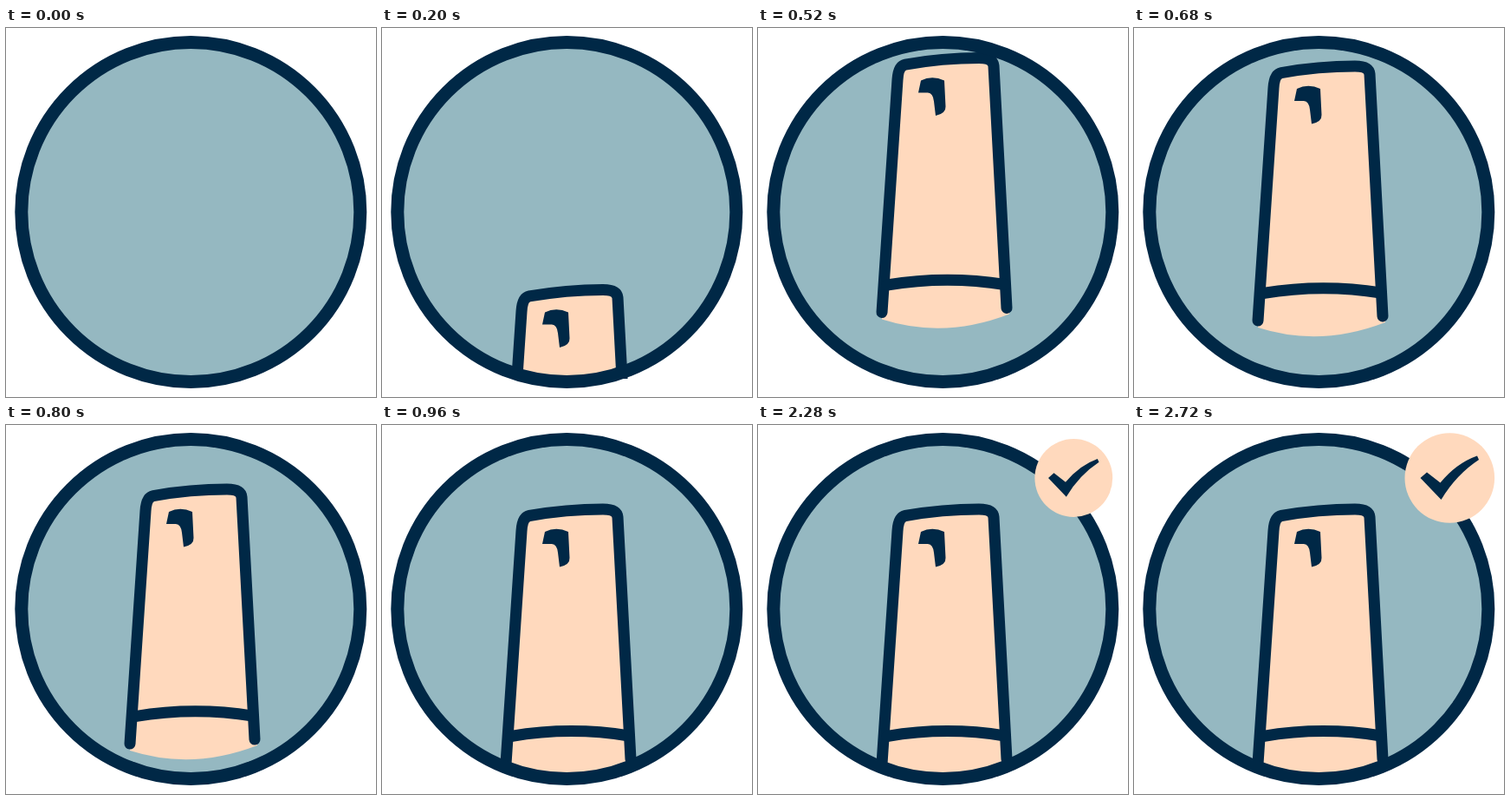
An HTML page that plays this animation: 427x425 px, repeating every 3.84 s.

```html
<!DOCTYPE html>
<html lang="en">
<head>
<meta charset="utf-8">
<title>Finger check</title>
<style>
  html, body { margin: 0; width: 100%; height: 100%; overflow: hidden; background: #fff; }
  svg { display: block; width: 100%; height: 100%; }
  .line { fill: none; stroke: #002846; stroke-width: 13; stroke-linecap: round; stroke-linejoin: round; }
  .ink { fill: #002846; }
  .skin { fill: #ffd9bd; }
</style>
</head>
<body>
<svg viewBox="0 0 427 425">
  <clipPath id="stage"><rect width="427" height="404"/></clipPath>
  <circle cx="213.3" cy="212" r="195" fill="#95b8c1"/>
  <g clip-path="url(#stage)">
    <g id="finger">
      <path class="skin" d="M143 398 L161 122 Q162 106 170 104.5 Q213 97 255 97 Q271 97 272 106 L290 392 Q215 421 143 398 Z"/>
      <path class="line" d="M143 390 L161 122 Q162 106 170 104.5 Q213 97 255 97 Q271 97 272 106 L287 385"/>
      <path class="line" d="M149 358.5 Q217 347 285 358"/>
      <path class="ink" d="M188 123 Q201 116.5 215 123 L216.5 153 Q217 161 205 163.5 L203 147 Q202 137.5 196 137 L185 137 Z"/>
    </g>
  </g>
  <circle cx="213.3" cy="212" r="195.5" fill="none" stroke="#002846" stroke-width="15"/>
  <g id="badge">
    <circle class="skin" cx="364.3" cy="61" r="51.8"/>
    <path class="ink" d="M330.5 61 L338 54.5 L353.5 66.5 Q372 44 396 35.5 L398 40 Q372 57 354.5 86 Z"/>
  </g>
</svg>
<script>
const LOOP = 3840;
const finger = document.getElementById('finger');
const badge = document.getElementById('badge');

// keys: [time, value] pairs joined with sine in-out easing
function tween(t, keys) {
  if (t <= keys[0][0]) return keys[0][1];
  for (let i = 1; i < keys.length; i++) {
    const [t0, a] = keys[i - 1], [t1, b] = keys[i];
    if (t < t1) return a + (b - a) * (1 - Math.cos(Math.PI * (t - t0) / (t1 - t0))) / 2;
  }
  return keys[keys.length - 1][1];
}

function draw(t) {
  const y = tween(t, [[0, 313], [560, -67], [960, 0]]);
  finger.setAttribute('transform', `translate(0 ${y})`);

  const s = tween(t, [[1880, 0], [2440, 1.065], [2720, 1]]);
  badge.setAttribute('visibility', t < 1960 ? 'hidden' : 'visible');
  badge.setAttribute('transform', `translate(364.3 61) scale(${s}) translate(-364.3 -61)`);
}

const start = performance.now();
function tick() {
  draw((performance.now() - start) % LOOP);
  requestAnimationFrame(tick);
}
tick();
</script>
</body>
</html>
```
